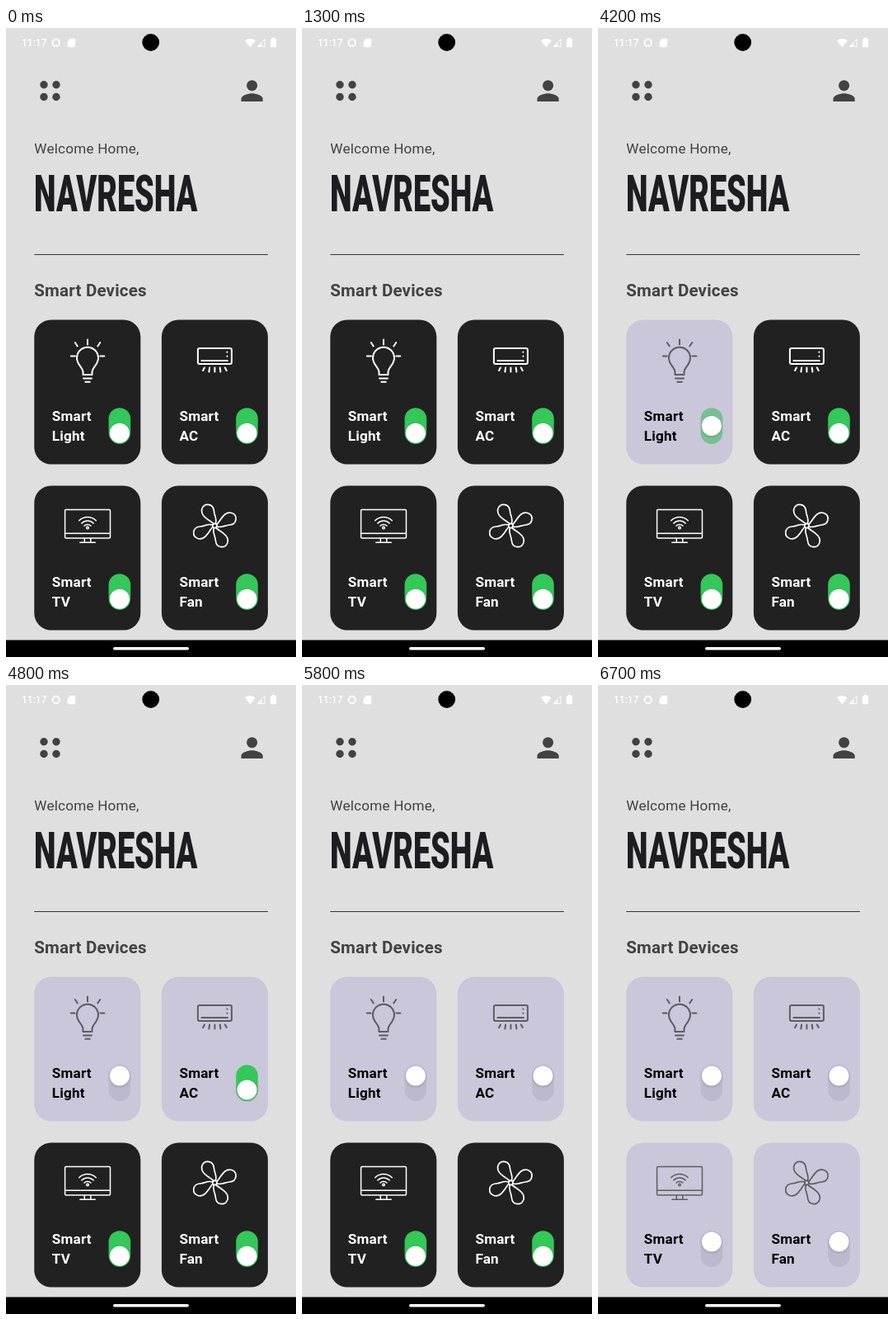
An HTML page that plays this animation: 352 px wide and 762 px high, repeating every 8000 ms.

```html
<!DOCTYPE html>
<html lang="en">
<head>
<meta charset="utf-8">
<title>Smart home</title>
<style>
  html, body { margin: 0; height: 100%; overflow: hidden; background: #dfdfdf; }
  svg { display: block; width: 100vw; height: 100vh; }
  text { font: 17.12px Roboto, sans-serif; letter-spacing: .21px; fill: #424242; }
  .title { font-size: 20.5px; font-weight: 700; }
  .name { font-size: 62px; font-weight: 900; letter-spacing: 0; fill: #1d1d1f; }
  .clock { font-size: 12px; font-weight: 500; letter-spacing: 0; fill: #fff; }
  .card text { font-weight: 700; fill: #fff; }
  .card > rect { fill: #212121; }
  .card .icon { fill: none; stroke: #fff; stroke-width: 2; stroke-linecap: round; stroke-linejoin: round; }
  .card .thin { stroke-width: 1.5; }
  .card .thumb { fill: #fff; filter: drop-shadow(0 1.5px 1.5px rgba(0, 0, 0, .2)); }
  .off > rect:first-child { fill: #c9c7d9; }
  .off text { fill: #000; }
  .off .icon { stroke: #5d5c63; }
</style>
</head>
<body>
<svg viewBox="0 0 352 762" preserveAspectRatio="none">
  <rect width="352" height="762" fill="#dfdfdf"/>

  <g fill="#fff">
    <text class="clock" x="19" y="22.3">11:17</text>
    <circle cx="60.7" cy="17.9" r="4.2" fill="none" stroke="#fff" stroke-width="2"/>
    <path d="M78 12.8h5q1.2 0 1.2 1.2v8q0 1.200-1.200 1.200h-7q-1.200 0-1.200-1.200v-6z"/>
    <path d="M296.300 23.300l-6.500-8q6.500-4.800 13 0z"/>
    <path d="M305 22.600l9-9v9z" fill="none" stroke="#fff"/>
    <path d="M305 22.600l5.500-5.500v5.500z"/>
    <path d="M323 13v-1.200h3.200v1.200h1q.9 0 .9.900v8.400q0 .9-.9.900h-5.200q-.9 0-.9-.9v-8.400q0-.9.900-.9z"/>
  </g>
  <circle cx="175.700" cy="17.500" r="10.400"/>

  <g fill="#424242">
    <circle cx="46" cy="68.800" r="4.700"/><circle cx="61" cy="68.800" r="4.700"/>
    <circle cx="46" cy="83.500" r="4.700"/><circle cx="61" cy="83.500" r="4.700"/>
    <circle cx="298.600" cy="69.700" r="6.500"/>
    <path d="M298.600 79.300c-4.400 0-13.100 2.200-13.100 6.500v3.300h26.200v-3.300c0-4.300-8.700-6.500-13.100-6.500z"/>
  </g>

  <text x="34.300" y="152">Welcome Home,</text>
  <text class="name" transform="translate(34 222) scale(.61 1)">NAVRESHA</text>
  <path d="M34.300 274.500H317.800" stroke="#333" stroke-width="1.200"/>
  <text class="title" x="34.300" y="324.500">Smart Devices</text>

  <g id="cards"></g>

  <rect y="741.500" width="352" height="21"/>
  <rect x="130" y="750" width="92" height="3.600" rx="1.800" fill="#fff"/>
</svg>
<script>
const LOOP = 8000, STEP = 100, SWITCH = 200;
const ON = [52, 199, 89], OFF = [187, 185, 203];

const blade = 'M-2-3C-8-8-18-12-15.500-20.500C-13-28-2-27.500-1-18C-.5-12 3-8 1-3';
const fan = [0, 90, 180, 270].map(a => `<path d="${blade}" transform="rotate(${a})"/>`).join('');
const arc = r => `M${64.7 - r * .71} ${52.5 - r * .71}a${r} ${r} 0 0 1 ${r * 1.42} 0`;

// Icons use coordinates local to their card.
const devices = [
  { label: 'Light', x: 0, y: 0, offAt: 4100, icon: `<path class="icon" d="M59.200 66.500v-3c0-6-7.500-9-7.500-17.300a13 13 0 0 1 26 0c0 8.300-7.500 11.300-7.500 17.300v3zM59.700 71h10M62 75.300h5.500
    M64.700 24v6M49.500 27.500l3 4.500M80 27.500l-3 4.500M44.500 44h5M80 44h5"/>` },
  { label: 'AC', x: 154.600, y: 0, offAt: 4790, icon: `<path class="icon" d="M46 34.500h37q2 0 2 2v15q0 2-2 2h-37q-2 0-2-2v-15q0-2 2-2zM48.500 49.500h31.500M79.500 39v.3M79.500 44v.3
    M52 58l-1.800 3.500M58.200 58l-.7 5M64.500 58v5M70.800 58l.7 5M77 58l1.800 3.500"/>` },
  { label: 'TV', x: 0, y: 201, offAt: 5840, icon: `<path class="icon thin" d="M38.500 29h52.500q1.200 0 1.200 1.200v32q0 1.200-1.200 1.200h-52.500q-1.200 0-1.200-1.200v-32q0-1.200 1.200-1.200z
    M37.300 57.800h54.900M61 63.500v5M68.500 63.500v5M55.500 68.700h18.500${arc(5.5)}${arc(10)}${arc(14.5)}"/><circle class="icon thin" cx="64.700" cy="51" r="1.300"/>` },
  { label: 'Fan', x: 154.600, y: 201, offAt: 6490, icon: `<g class="icon" transform="translate(64.500 48.500)" style="stroke-width:1.700">${fan}<circle r="2.600"/></g>` }
];

const cards = document.getElementById('cards');
cards.innerHTML = devices.map(d => `<g class="card" transform="translate(${34.3 + d.x} ${353.5 + d.y})">
  <rect width="129" height="175" rx="20.500"/>${d.icon}
  <text x="21.500" y="122.300">Smart</text><text x="21.500" y="146.800">${d.label}</text>
  <rect class="track" x="90.300" y="106.700" width="26.600" height="43.700" rx="13.300"/>
  <circle class="thumb" cx="103.600" r="12"/></g>`).join('');

devices.forEach((d, i) => {
  d.card = cards.children[i];
  d.track = d.card.querySelector('.track');
  d.thumb = d.card.querySelector('.thumb');
});

const mix = (a, b, p) => a + (b - a) * p;
const ease = p => p * p * (3 - 2 * p);

function draw() {
  const time = Math.floor(performance.now() % LOOP / STEP) * STEP;
  for (const d of devices) {
    const p = ease(Math.min(1, Math.max(0, (time - d.offAt) / SWITCH)));
    d.card.classList.toggle('off', time > d.offAt);
    d.track.style.fill = `rgb(${ON.map((c, i) => mix(c, OFF[i], p))})`;
    d.thumb.setAttribute('cy', mix(137.2, 120, p));
  }
  requestAnimationFrame(draw);
}
draw();
</script>
</body>
</html>
```
